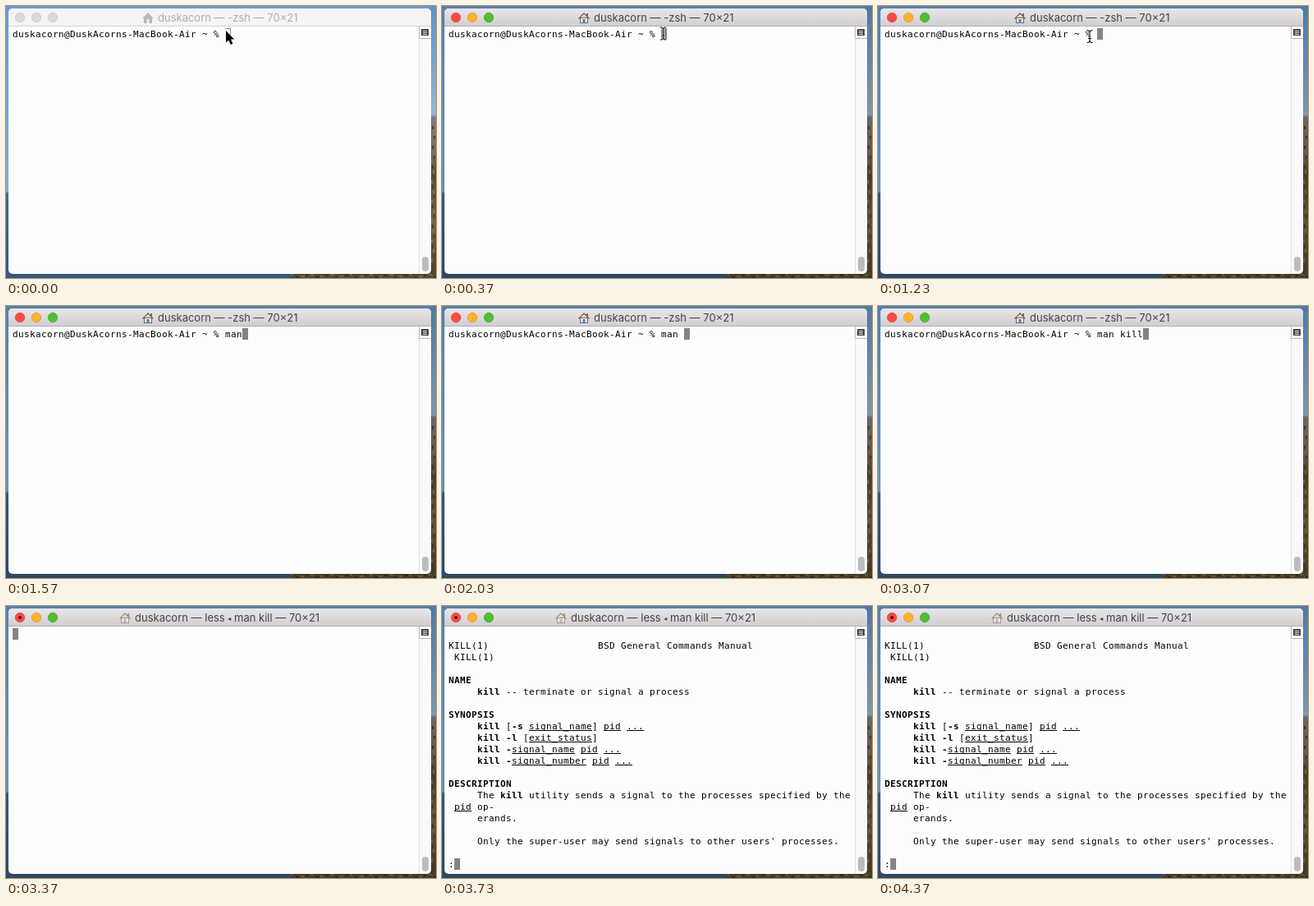
Animation of 524x331 px, one loop 4410 ms. Source, as an HTML page with a canvas:

```html
<!DOCTYPE html>
<html lang="en">
<head>
<meta charset="utf-8">
<title>Terminal: man kill</title>
<style>
  html, body { margin: 0; width: 100%; height: 100%; overflow: hidden; }
  canvas { display: block; width: 524px; height: 331px; }
</style>
</head>
<body>
<canvas id="stage" width="524" height="331"></canvas>
<script>
const ctx = document.getElementById('stage').getContext('2d');
const LOOP = 4410, LEFT = 8, TOP = 27, CELL = 7, ROW = 14;
const MONO = '"DejaVu Sans Mono", monospace';
const SANS = 'Inter, sans-serif';

const ACTIVATE = 160, HIDE_POINTER = 1250, ENTER = 3080, CLEAR = 3200, PAGE = 3520;
const PROMPT = 'duskacorn@DuskAcorns-MacBook-Air ~ % ';
const COMMAND = 'man kill';
const KEY_TIMES = [1280, 1400, 1530, 1880, 2130, 2400, 2620, 2860];

// pointer path: time, x, y
const PATH = [[0, 268, 30], [160, 268, 31], [370, 269.5, 33.5], [530, 266, 34], [670, 258, 37]];

// * toggles bold, | toggles underline
const MANUAL = [
  '',
  'KILL(1)                   BSD General Commands Manual',
  ' KILL(1)',
  '',
  '*NAME*',
  '     *kill* -- terminate or signal a process',
  '',
  '*SYNOPSIS*',
  '     *kill* [*-s* |signal_name|] |pid| |...|',
  '     *kill* *-l* [|exit_status|]',
  '     *kill* *-*|signal_name| |pid| |...|',
  '     *kill* *-*|signal_number| |pid| |...|',
  '',
  '*DESCRIPTION*',
  '     The *kill* utility sends a signal to the processes specified by the',
  ' |pid| op-',
  '     erands.',
  '',
  "     Only the super-user may send signals to other users' processes.",
  '',
  ':'
];

function rect(x, y, w, h, color) {
  ctx.fillStyle = color;
  ctx.fillRect(x, y, w, h);
}

function round(x, y, w, h, r, color) {
  ctx.beginPath();
  ctx.roundRect(x, y, w, h, r);
  ctx.fillStyle = color;
  ctx.fill();
}

function disc(x, y, r, color, edge) {
  ctx.beginPath();
  ctx.arc(x, y, r, 0, 2 * Math.PI);
  ctx.fillStyle = color;
  ctx.fill();
  if (edge) {
    ctx.strokeStyle = edge;
    ctx.lineWidth = 0.7;
    ctx.stroke();
  }
}

function shape(points, color) {
  ctx.beginPath();
  points.forEach(([x, y]) => ctx.lineTo(x, y));
  ctx.closePath();
  ctx.fillStyle = color;
  ctx.fill();
}

function fade(y0, y1, ...stops) {
  const g = ctx.createLinearGradient(0, y0, 0, y1);
  stops.forEach(([at, color]) => g.addColorStop(at, color));
  return g;
}

function line(text, row) {
  let col = 0, bold = false, under = false;
  const y = TOP + row * ROW;
  for (const ch of text) {
    if (ch === '*') { bold = !bold; continue; }
    if (ch === '|') { under = !under; continue; }
    const x = LEFT + CELL * col++;
    ctx.font = (bold ? 'bold ' : '') + '11px ' + MONO;
    ctx.fillStyle = '#000';
    ctx.fillText(ch, x, y + 11);
    if (under) rect(x, y + 12, CELL, 1, '#000');
  }
}

function cursor(col, row, active = true) {
  const x = LEFT + col * CELL, y = TOP + row * ROW;
  if (active) return rect(x, y, CELL, ROW, '#858385');
  ctx.strokeStyle = '#858385';
  ctx.lineWidth = 1;
  ctx.strokeRect(x + 0.5, y + 0.5, CELL - 1, ROW - 1);
}

function desktop(active) {
  rect(0, 0, 524, 331, fade(0, 331, [0, '#659bd0'], [0.68, '#84add3'], [0.69, '#44678f'], [1, '#385778']));
  rect(515, 0, 9, 331, fade(0, 331, [0, '#5c94cc'], [0.4, '#94b6d5'], [0.41, '#7e7b80'],
    [0.55, '#776953'], [0.62, '#594d31'], [0.8, '#75613d'], [1, '#4d4229']));
  rect(347, 324, 177, 7, '#544a32');
  for (let i = 0; i < 30; i++) {
    rect(347 + i * 6, 326 + i * 3 % 4, 3 + i % 3, 2, i % 2 ? '#3a3423' : '#786743');
    rect(518 + i * 5 % 4, 140 + i * 6, 2, 4, i % 2 ? '#4d442e' : '#8b7650');
  }
  if (active) rect(0, 0, 524, 331, 'rgba(0,0,0,.17)');
}

function house(x, active, dim) {
  ctx.save();
  ctx.translate(x, 8);
  if (!active) {
    shape([[0, 7], [7, 0], [14, 7], [12, 7], [12, 13], [2, 13], [2, 7]], '#b9b5b9');
    rect(5.5, 8, 3, 5, '#f6f3f6');
  } else {
    ctx.globalAlpha = dim ? 0.6 : 1;
    rect(10, 1, 2, 4, '#8d5a48');
    shape([[2, 6], [7, 1.5], [12, 6], [12, 13], [2, 13]], '#f5f0e5');
    ctx.strokeStyle = '#6d6865';
    ctx.lineWidth = 1;
    ctx.strokeRect(2.5, 6.5, 9, 6);
    shape([[0, 7], [7, 0], [14, 7], [13, 8], [7, 2.3], [1, 8]], '#746b65');
    rect(5.5, 5, 3, 2, '#d58c42');
    rect(5.5, 8, 3, 5, dim ? '#a79c8d' : '#4c83b8');
  }
  ctx.restore();
}

function title(x, parts, color) {
  ctx.fillStyle = color;
  for (const part of parts) {
    ctx.font = (part === '◂' ? 8 : 13) + 'px ' + SANS;
    ctx.fillText(part, x, part === '◂' ? 18 : 19);
    x += ctx.measureText(part).width;
  }
}

function frame(active, less) {
  round(3, 3, 515, 323, 5, '#fefdfe');
  round(3, 3, 515, 22, [5, 5, 0, 0], active
    ? fade(3, 25, [0, '#e9e5e9'], [1, '#d0ccd0']) : '#f6f2f6');
  rect(3, 24, 515, 1, active ? '#b3afb3' : '#d8d4d8');

  const lights = [['#fb4b46', '#d53c37'], ['#fdb32c', '#d9962a'], ['#4fc02f', '#3c9f29']];
  lights.forEach(([fill, edge], i) =>
    disc(17 + 20 * i, 14, 5.7, active ? fill : '#dcd8dc', active ? edge : '#c6c2c6'));
  if (less) disc(17, 14, 2, '#4a0705');

  house(less ? 138 : 166, active, less);
  const parts = less ? ['duskacorn — less ', '◂', ' man kill — 70×21'] : ['duskacorn — -zsh — 70×21'];
  title(less ? 157 : 185, parts, active ? '#484448' : '#b0acb0');

  rect(503, 25, 15, 301 - 5, '#faf8fa');
  rect(503, 25, 1, 301, '#e3dfe3');
  round(507, 305, 8, 18, 4, '#bebbbe');
  rect(503, 25, 15, 15, '#b9b6b9');
  rect(504, 25, 14, 14, '#fefdfe');
  rect(506, 28, 9, 8, '#454245');
  for (const y of [30, 32, 34]) rect(508, y, 5, 1, '#dedade');
}

function pointer(t) {
  const last = PATH[PATH.length - 1];
  const i = PATH.findIndex(p => p[0] > t);
  let [, x, y] = last;
  if (i > 0) {
    const [t0, x0, y0] = PATH[i - 1], [t1, x1, y1] = PATH[i];
    const k = (t - t0) / (t1 - t0), s = k * k * (3 - 2 * k);
    x = x0 + (x1 - x0) * s;
    y = y0 + (y1 - y0) * s;
  }
  ctx.save();
  ctx.translate(x, y);
  ctx.beginPath();
  if (t < ACTIVATE) {
    [[0, 0], [0, 14.5], [3.3, 11.5], [5.6, 17], [8.3, 15.8], [6, 10.6], [10.2, 10.6]]
      .forEach(([px, py]) => ctx.lineTo(px, py));
    ctx.closePath();
    ctx.strokeStyle = '#fff';
    ctx.lineWidth = 2;
    ctx.stroke();
    ctx.fillStyle = '#000';
    ctx.fill();
  } else {
    for (const d of [-1, 1]) {
      ctx.moveTo(-3.5, 7.5 * d);
      ctx.quadraticCurveTo(0, 7.5 * d, 0, 5 * d);
      ctx.quadraticCurveTo(0, 7.5 * d, 3.5, 7.5 * d);
    }
    ctx.moveTo(0, -6);
    ctx.lineTo(0, 6);
    ctx.moveTo(-2, 2.5);
    ctx.lineTo(2, 2.5);
    for (const [color, width] of [['#fff', 2.4], ['#111', 1.2]]) {
      ctx.strokeStyle = color;
      ctx.lineWidth = width;
      ctx.stroke();
    }
  }
  ctx.restore();
}

function draw(t) {
  const active = t >= ACTIVATE;
  desktop(active);
  frame(active, t >= CLEAR);
  if (t >= PAGE) {
    cursor(1, 20);
    MANUAL.forEach(line);
  } else if (t >= CLEAR) {
    cursor(0, 0);
  } else {
    const typed = KEY_TIMES.filter(k => k <= t).length;
    if (t >= ENTER) cursor(0, 1);
    else cursor(PROMPT.length + typed, 0, active);
    line(PROMPT + COMMAND.slice(0, typed), 0);
  }
  if (t < HIDE_POINTER) pointer(t);
}

const start = performance.now();
function tick() {
  draw((performance.now() - start) % LOOP);
  requestAnimationFrame(tick);
}
tick();
</script>
</body>
</html>
```
